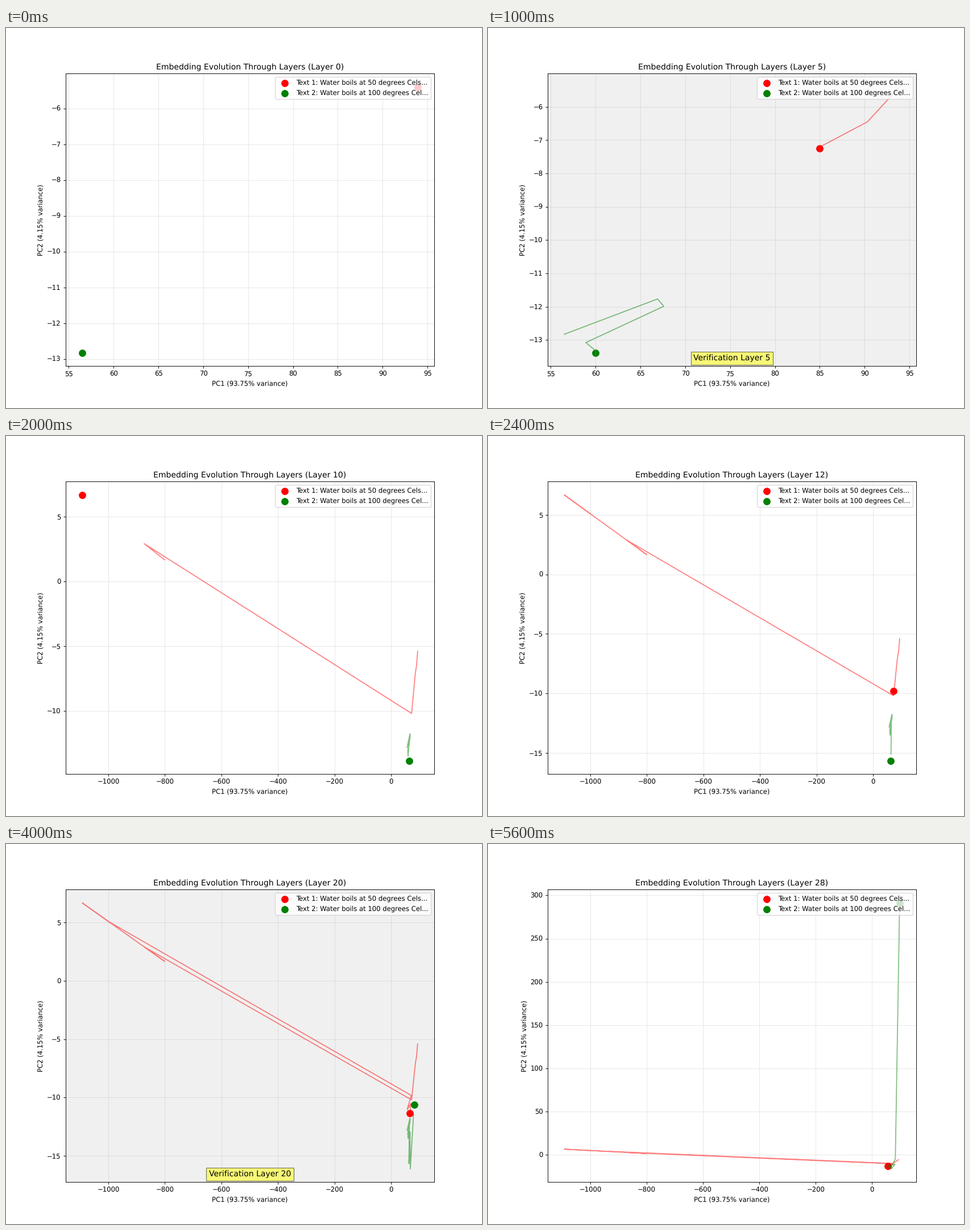
A matplotlib script that plays this animation: 837 px wide and 669 px high, repeating every 5.8 s.

```python
import numpy as np
import matplotlib.pyplot as plt
from matplotlib.animation import FuncAnimation

DPI = 83.7
LAYERS = 29
VERIFY = {5, 8, 15, 20}


def track(keys):
    """Ease through (layer, PC1, PC2) key points, one position per layer."""
    keys = np.array(keys)
    at, pos = keys[:, 0], keys[:, 1:]
    layer = np.arange(LAYERS)
    i = np.clip(np.searchsorted(at, layer, "right") - 1, 0, len(at) - 2)
    u = np.clip((layer - at[i]) / (at[i + 1] - at[i]), 0, 1)
    u = (u * u * (3 - 2 * u))[:, None]
    return pos[i] + u * (pos[i + 1] - pos[i])


text1 = track([
    (0, 93.9, -5.4), (2, 90.3, -6.45), (4, 85.1, -7.19), (5, 85, -7.25),
    (7, 72.6, -10.2), (12, 71.4, -9.82), (14.5, 56, -11.1), (17, 70, -10.5),
    (20, 66.4, -11.37), (23, 63, -12), (25, 71, -11.39), (28, 55.5, -12.8),
])
# the mid-layer excursion runs along one straight direction
spike = np.array([-873.6, -801, -1092.5, -1000])
text1[8:12] = np.column_stack([spike, -12.11 - 0.0172 * spike])

text2 = track([
    (0, 56.5, -12.83), (1, 66.9, -11.77), (2, 67.6, -11.99), (3, 58.9, -13.08),
    (4, 59.8, -13.28), (6, 60.2, -13.5), (8, 64.8, -12.06), (12, 63, -15.67),
    (14, 67, -12.95), (16, 68, -16.12), (20, 81.5, -10.62), (22, 52, -14.12),
    (24, 72, -11.4), (25, 82.5, -4.36),
])
# the last two layers jump away
text2[27:] = 97.7, 291.3

SERIES = [
    (text1, "red", "Text 1: Water boils at 50 degrees Cels..."),
    (text2, "green", "Text 2: Water boils at 100 degrees Cel..."),
]

plt.rcParams["text.hinting"] = "none"
# the tiny offset guards against float truncation of the pixel size
fig, ax = plt.subplots(figsize=((837 + 1e-6) / DPI, (669 + 1e-6) / DPI), dpi=DPI)


def draw(layer):
    ax.clear()
    verifying = layer in VERIFY
    ax.set_facecolor("#f0f0f0" if verifying else "white")
    for path, color, label in SERIES:
        ax.scatter(*path[layer], s=100, color=color, label=label)
        if layer:
            ax.plot(*path[:layer].T, color=color, alpha=0.5)
    if verifying:
        ax.text(0.5, 0.02, f"Verification Layer {layer}", transform=ax.transAxes,
                ha="center", fontsize=12, bbox=dict(facecolor="yellow", alpha=0.5))
    ax.set_title(f"Embedding Evolution Through Layers (Layer {layer})")
    ax.set_xlabel("PC1 (93.75% variance)")
    ax.set_ylabel("PC2 (4.15% variance)")
    ax.grid(True, alpha=0.3)
    ax.legend(loc="upper right", labelspacing=0.53)
    return []


anim = FuncAnimation(fig, draw, frames=LAYERS, init_func=lambda: draw(0),
                     interval=200, repeat=True, repeat_delay=0)
plt.show()
```
